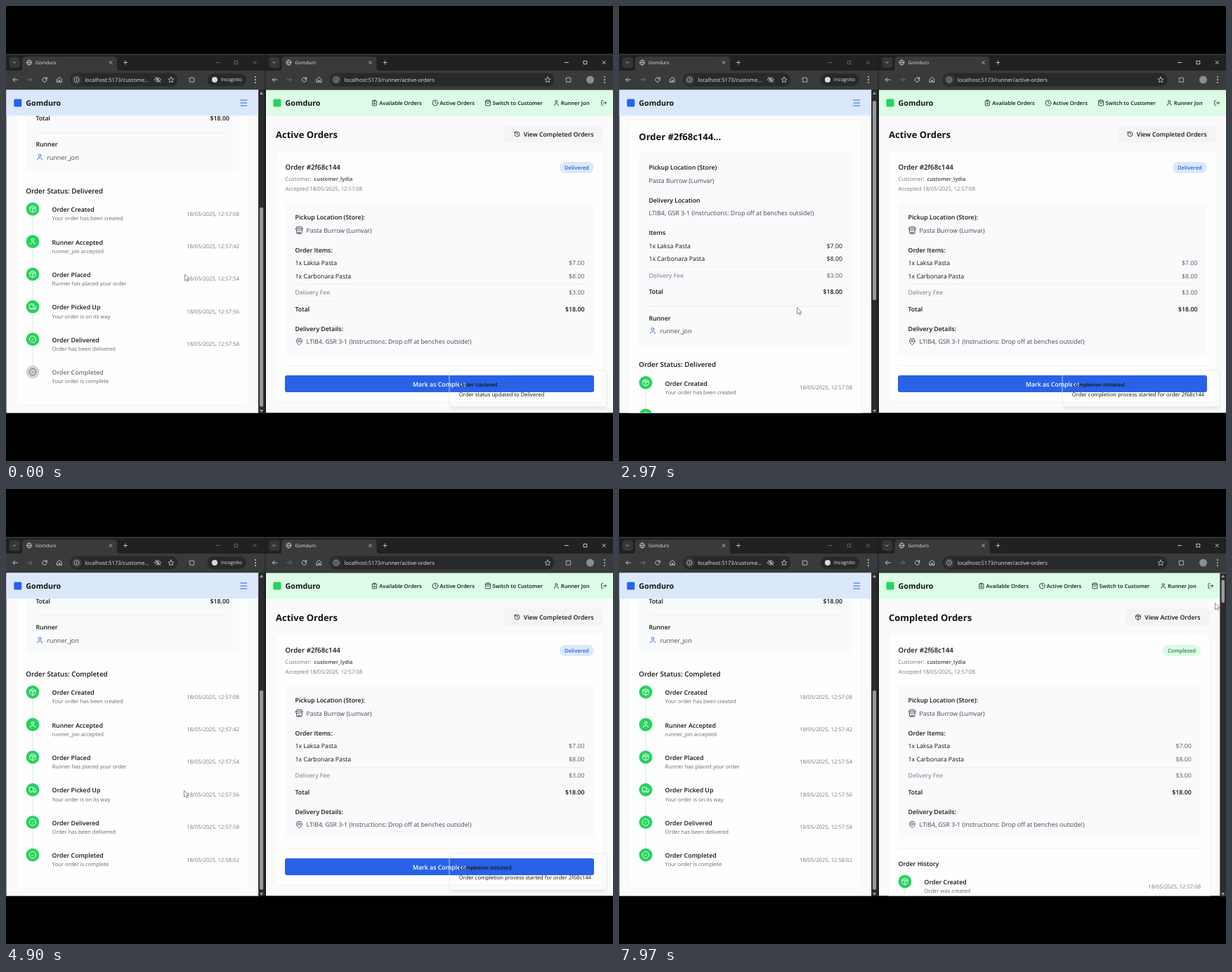
These frames come from a looping animation (864 by 648 pixels, 8 s). An HTML page:

```html
<!DOCTYPE html>
<html lang="en">
<head>
<meta charset="utf-8">
<title>Order tracking</title>
<style>
html, body { margin: 0; width: 100%; height: 100%; overflow: hidden; background: #000; }
svg { display: block; width: 864px; height: 648px; font-family: "Open Sans", "Noto Sans", sans-serif; text-rendering: geometricPrecision; }
</style>
</head>
<body>
<svg id="stage" viewBox="0 0 864 648" xmlns="http://www.w3.org/2000/svg"></svg>
<script>
const APP = 'Gomduro', RUNNER = 'runner_jon', STORE = 'Pasta Burrow (Lumvar)';
const PLACE = 'LTIB4, GSR 3-1 (Instructions: Drop off at benches outside!)';
const SM = 7.65, MD = 8.77, LG = 9.75, XL = 13;
const INK = '#141414', MID = '#41454d', GRAY = '#747880', GREEN = '#27d25e', BLUE = '#2962e6';
const PAGE = '#fafafb', LINK = '#cdeed6';
const TOP = 119.5, BOTTOM = 579.6, VIEW = BOTTOM - TOP;
const LOOP = 8000, MAX_SCROLL = 247.3;

const ring = (cx, cy, r) => `M${cx + r} ${cy}a${r} ${r} 0 1 1-${2 * r} 0a${r} ${r} 0 1 1 ${2 * r} 0`;
const ICONS = {
  bag: 'M6 2 3 6v14a2 2 0 0 0 2 2h14a2 2 0 0 0 2-2V6l-3-4ZM3 6h18M16 10a4 4 0 0 1-8 0',
  box: 'M21 8a2 2 0 0 0-1-1.7l-7-4a2 2 0 0 0-2 0l-7 4A2 2 0 0 0 3 8v8a2 2 0 0 0 1 1.7l7 4a2 2 0 0 0 2 0l7-4A2 2 0 0 0 21 16ZM3.3 7 12 12l8.7-5M12 22V12M7.5 4.3l9 5.1',
  user: 'M19 21v-2a4 4 0 0 0-4-4H9a4 4 0 0 0-4 4v2' + ring(12, 7, 4),
  truck: 'M14 18V6a2 2 0 0 0-2-2H4a2 2 0 0 0-2 2v11a1 1 0 0 0 1 1h2M15 18H9M19 18h2a1 1 0 0 0 1-1v-4l-4-5h-4' + ring(17, 18, 2) + ring(7, 18, 2),
  check: ring(12, 12, 10) + 'M8.5 12l2.5 2.5 4.5-4.5',
  clock: ring(12, 12, 10) + 'M12 6v6l4 2',
  history: 'M3 12a9 9 0 1 0 9-9 9.8 9.8 0 0 0-6.7 2.7L3 8M3 3v5h5M12 7v5l4 2',
  list: 'M9 2h6v4H9zM16 4h2a2 2 0 0 1 2 2v14a2 2 0 0 1-2 2H6a2 2 0 0 1-2-2V6a2 2 0 0 1 2-2h2M9 12h6M9 16h6',
  exit: 'M9 21H5a2 2 0 0 1-2-2V5a2 2 0 0 1 2-2h4M16 17l5-5-5-5M21 12H9',
  pin: 'M20 10c0 6-8 12-8 12s-8-6-8-12a8 8 0 0 1 16 0' + ring(12, 10, 3),
  store: 'M2 7l3-5h14l3 5v3a3 3 0 0 1-5 1 3 3 0 0 1-5 0 3 3 0 0 1-5 0 3 3 0 0 1-5-1zM4 12v8a2 2 0 0 0 2 2h12a2 2 0 0 0 2-2v-8M2 7h20M9 22v-4h6v4',
  globe: ring(12, 12, 10) + 'M2 12h20M12 2c-6 6-6 14 0 20M12 2c6 6 6 14 0 20',
  down: 'M6 9l6 6 6-6',
  back: 'M21 12H4M11 5l-7 7 7 7',
  next: 'M3 12h17M13 5l7 7-7 7',
  reload: 'M20 12a8 8 0 1 1-2.4-5.7L20 9M20 3v6h-6',
  home: 'M4 10l8-7 8 7v11h-6v-7h-4v7H4z',
  info: ring(12, 12, 10) + 'M12 11v6M12 7v1',
  star: 'M12 2l3 7 7 .6-5.4 4.8 1.7 7.1L12 17.7 5.7 21.5l1.7-7.1L2 9.6 9 9z',
  puzzle: 'M4 6h5a3 3 0 0 1 6 0h5v14H4v-5a3 3 0 0 0 0-5z',
  eye: 'M2 12c5-9 15-9 20 0-5 9-15 9-20 0' + ring(12, 12, 3) + 'M3 3l18 18',
  close: 'M5 5l14 14M19 5L5 19',
  plus: 'M12 4v16M4 12h16',
  min: 'M4 12h16',
  max: 'M5 5h14v14H5z'
};

const rect = (x, y, w, h, fill, r = 0, extra = '') =>
  `<rect x="${x}" y="${y}" width="${w}" height="${h}" rx="${r}" fill="${fill}" ${extra}/>`;
const dot = (x, y, r, fill) => `<circle cx="${x}" cy="${y}" r="${r}" fill="${fill}"/>`;
// y is the middle of the capitals
const text = (x, y, str, size = MD, fill = INK, weight = 400, anchor = 'start') =>
  `<text x="${x}" y="${(y + size * .357).toFixed(2)}" font-size="${size}" fill="${fill}" font-weight="${weight}" text-anchor="${anchor}">${str}</text>`;
const bold = (x, y, str, size = MD, fill = INK) => text(x, y, str, size, fill, 600);
const endText = (x, y, str, size, fill, weight) => text(x, y, str, size, fill, weight, 'end');
const icon = (name, x, y, size, color, w = 2) =>
  `<path d="${ICONS[name]}" transform="translate(${x - size / 2} ${y - size / 2}) scale(${size / 24})" fill="none" stroke="${color}" stroke-width="${w}" stroke-linecap="round" stroke-linejoin="round"/>`;
const rule = (x1, x2, y) => rect(x1, y - .3, x2 - x1, .6, '#e8eaed');
const group = (id, body) => `<g id="${id}">${body}</g>`;
const card = (x, y, w, h) => rect(x, y, w, h, '#fefefe', 4, 'stroke="#f1f2f4" stroke-width=".7"');
const panel = (x, y, w, h) => rect(x, y, w, h, '#f9fafb', 4);

function chrome(x, w, url, pillEnd, ctl, lit) {
  const icons = [['back', 13], ['next', 34, '#77797c'], ['reload', 55], ['home', 76]];
  let s = rect(x, 68.5, w, 51, '#202122') + rect(x, 68.5, w, 1, '#4c4d4e') + rect(x, 92, w, TOP - 92, '#393a3b');
  s += rect(x + 5, 73, 15, 15, '#353638', 4) + icon('down', x + 12, 80.5, 7, '#ddd', 2.6);
  s += `<path d="M${x + 19} 92q4 0 4-4v-11q0-5 5-5h125q5 0 5 5v11q0 4 4 4z" fill="#393a3b"/>`;
  s += icon('globe', x + 33, 80.5, 8.5, '#d0d2d4') + text(x + 42, 80.5, APP, 6.6, '#e6e6e6');
  s += icon('close', x + 149, 80.5, 6.5, '#ddd', 2.8) + icon('plus', x + 170, 80.5, 8, '#ddd', 2.4);
  ['min', 'max', 'close'].forEach((n, i) => { s += icon(n, ctl + i * 26.6, 80.5, 7.5, lit ? '#f2f2f2' : '#77797b', 2.6); });
  icons.forEach(([n, dx, c]) => { s += icon(n, x + dx, 105, 9.5, c || '#d0d2d4', 2.3); });
  s += rect(x + 91, 95.5, pillEnd - x - 91, 19, '#28292a', 9.5) + dot(x + 100.5, 105, 7, '#3a3b3d');
  s += icon('info', x + 100.5, 105, 8.5, '#d0d2d4') + text(x + 112.2, 105, url, SM, '#e3e3e3');
  return s + icon('star', pillEnd - 9.5, 105, 9.5, '#d0d2d4');
}
const dots = x => [101, 105, 109].map(y => dot(x, y, .95, '#d6d7d9')).join('');
const scrollTrack = (x, thumb) => rect(x, TOP, 8.9, VIEW, '#2b2b2c') +
  `<path d="M${x + 1.8} 126l2.6-4 2.6 4zM${x + 1.8} 575l2.6 4 2.6-4z" fill="#9b9b9b"/>` + thumb;

function step(x, y, end, kind, title, desc, time, pending) {
  return dot(x, y, 9.4, pending ? '#d0d4da' : GREEN) + icon(kind, x, y, 11.2, pending ? '#565e6b' : '#fff', 1.9) +
    bold(x + 27.5, y + 1, title, MD, pending ? '#6d7179' : INK) +
    text(x + 27.5, y + 13.6, desc, SM, '#666a72') +
    (time ? endText(end, y + 6.8, '18/05/2025, ' + time, SM, GRAY) : '');
}
const connector = (x, y, fill = LINK) => rect(x - .5, y, 1, 27, fill);

function customerPage() {
  let s = card(15, 162, 329.5, 653.5) + text(28.3, 186, 'Order #2f68c144...', XL, INK, 700) + panel(28.3, 208, 303.7, 275);
  s += bold(42.4, 230, 'Pickup Location (Store)') + text(42.4, 248.5, STORE, MD, MID);
  s += bold(42.4, 276.4, 'Delivery Location') + text(42.4, 295, PLACE, MD, MID) + bold(42.4, 322.7, 'Items');
  [['1x Laksa Pasta', '$7.00', 341.5], ['1x Carbonara Pasta', '$8.00', 360]].forEach(([a, b, y]) => {
    s += text(42.4, y, a) + endText(318, y, b);
  });
  s += rule(42.4, 318, 371.5) + text(42.4, 383.5, 'Delivery Fee', MD, GRAY) + endText(318, 383.5, '$3.00', MD, '#595d64');
  s += rule(42.4, 318, 395) + bold(42.4, 407, 'Total') + endText(318, 407, '$18.00', MD, INK, 600);
  s += rule(42.4, 318, 427.5) + bold(42.4, 444.5, 'Runner') + icon('user', 48, 462.5, 11, '#3b68d8') + text(58.5, 463, RUNNER, MD, MID);
  s += group('headOpen', bold(28.3, 510.5, 'Order Status: Delivered', LG)) + group('headDone', bold(28.3, 510.5, 'Order Status: Completed', LG));
  const steps = [
    ['box', 'Order Created', 'Your order has been created', '12:57:08'],
    ['user', 'Runner Accepted', RUNNER + ' accepted', '12:57:42'],
    ['box', 'Order Placed', 'Runner has placed your order', '12:57:54'],
    ['truck', 'Order Picked Up', 'Your order is on its way', '12:57:56'],
    ['check', 'Order Delivered', 'Order has been delivered', '12:57:58']
  ];
  const y0 = 536.4, gap = 46.4, last = ['check', 'Order Completed', 'Your order is complete'];
  steps.forEach((d, i) => {
    const y = y0 + i * gap;
    s += step(38, y, 332, ...d) + (i < 4 ? connector(38, y + 10) : '');
  });
  const y = y0 + 5 * gap;
  return s + group('stepOpen', connector(38, y - 36.4, '#e2e5e9') + step(38, y, 332, ...last, '', true)) +
    group('stepDone', connector(38, y - 36.4) + step(38, y, 332, ...last, '12:58:02'));
}

// dx moves right-aligned parts when the scrollbar takes space
function runnerNav(dx) {
  const items = [['list', 524.5, 'Available Orders', 531.3], ['clock', 611, 'Active Orders', 617.5],
    ['bag', 686, 'Switch to Customer', 692.5], ['user', 783.3, 'Runner Jon', 789.8]];
  return items.map(([n, ix, label, tx]) => icon(n, ix + dx, 138, 9.3, INK) + bold(tx + dx, 138.2, label, 7.6)).join('') +
    icon('exit', 851 + dx, 138, 9, INK);
}

function pageHead(title, kind, label, x, right) {
  return text(384, 183, title, XL, INK, 700) + rect(x, 170.5, right - x, 24.5, '#f3f4f6', 4) +
    icon(kind, x + 18, 182.5, 9.3, INK) + bold(x + 27.2, 183, label);
}

function orderCard(dx, height, badge, badgeX, badgeW, bg, fg) {
  const r = 836.8 + dx, price = 823.5 + dx;
  let s = card(384, 206.5, 466 + dx, height) + bold(397.6, 230, 'Order #2f68c144', LG);
  s += rect(badgeX, 222, badgeW, 16, bg, 8) + text(badgeX + badgeW / 2, 230.2, badge, 7.6, fg, 600, 'middle');
  s += text(397.6, 246.5, 'Customer:', SM, GRAY) + bold(438.5, 246.5, 'customer_lydia', 7.5, '#3f444d') + text(397.6, 260.5, 'Accepted 18/05/2025, 12:57:08', SM, GRAY);
  s += panel(397.6, 280, r - 397.6, 218) + bold(411.5, 301, 'Pickup Location (Store):');
  s += icon('store', 417.3, 319.3, 11.4, MID) + text(427.6, 320, STORE, MD, MID) + bold(411.5, 347.5, 'Order Items:');
  [['1x Laksa Pasta', '$7.00', 366], ['1x Carbonara Pasta', '$8.00', 384.7]].forEach(([a, b, y]) => {
    s += text(411.5, y, a) + endText(price, y, b, MD, '#595d64');
  });
  s += rule(411.5, price, 396.5) + text(411.5, 408.2, 'Delivery Fee', MD, GRAY) + endText(price, 408.2, '$3.00', MD, '#595d64');
  s += rule(411.5, price, 420) + bold(411.5, 431.8, 'Total') + endText(price, 431.8, '$18.00', MD, INK, 600);
  s += bold(411.5, 459.6, 'Delivery Details:') + icon('pin', 417.3, 478, 11.4, MID) + text(427.6, 478.2, PLACE, MD, MID);
  return s + rule(397.6, r, 512.5);
}

const SHIFT = -8.7;
const activeHead = runnerNav(0) + pageHead('Active Orders', 'history', 'View Completed Orders', 709.5, 849);
const activeOrder = orderCard(0, 357, 'Delivered', 788, 48.8, '#dbe9fd', '#2f62d0') +
  rect(397, 526, 440, 24, BLUE, 3) + text(617.2, 538.6, 'Mark as Complete', MD, '#fff', 600, 'middle');
const completed = runnerNav(SHIFT) + pageHead('Completed Orders', 'box', 'View Active Orders', 721, 841) +
  orderCard(SHIFT, 420, 'Completed', 774, 54, '#dcfae7', '#25834d') + bold(397.6, 534, 'Order History') +
  connector(407, 569) + step(407, 559, 828, 'box', 'Order Created', 'Order was created', '12:57:08') +
  scrollTrack(855.3, rect(857.5, 129.5, 4.5, 32.5, '#9b9b9b', 2));
const toastText = (title, body) => bold(644.8, 538.8, title, 7.55) + text(644.8, 552.8, body, SM);

document.getElementById('stage').innerHTML = `
<defs>
  <clipPath id="leftView"><rect x="0" y="156" width="360" height="${BOTTOM - 156}"/></clipPath>
  <clipPath id="rightView"><rect x="370" y="${TOP}" width="494" height="${VIEW}"/></clipPath>
  <filter id="soft" x="-10%" y="-30%" width="120%" height="170%"><feGaussianBlur stdDeviation="2"/></filter>
</defs>` +
  rect(0, 0, 864, 648, '#000') + rect(0, 69, 864, 511, '#18191a') +
  chrome(0, 368.5, 'localhost:5173/custome...', 244.5, 301, false) +
  icon('eye', 216, 105, 10.5, '#d0d2d4') + icon('puzzle', 264.5, 105, 9.5, '#d0d2d4') +
  rect(286.5, 96, 55.5, 18, '#28292a', 9) + dot(297, 105, 4, '#d8d9db') + text(306, 105, 'Incognito', 6.9, '#ececec') + dots(355) +
  chrome(369.5, 494.5, 'localhost:5173/runner/active-orders', 780.5, 798, true) +
  icon('puzzle', 800.5, 105, 9.5, '#d0d2d4') + dot(831.5, 105, 5.5, '#8b8d90') + dots(852) +
  rect(0.5, TOP, 359, VIEW, PAGE) +
  `<g clip-path="url(#leftView)">${group('page', customerPage())}</g>` +
  rect(0.5, TOP, 359, 36.7, '#dbe8fc') + rect(11.3, 132.5, 11, 11, BLUE, 1.5) + text(28.3, 138.3, APP, 10.7, INK, 700) +
  [134, 138, 142].map(y => rect(333.3, y - .55, 10, 1.1, BLUE, .5)).join('') +
  scrollTrack(359.2, '<rect id="thumb" x="361.1" width="5" height="284" rx="2.5" fill="#9b9b9b"/>') +
  `<g clip-path="url(#rightView)">` + rect(370, TOP, 494, VIEW, PAGE) + rect(370, TOP, 494, 36.7, '#dcfce7') +
  rect(380.5, 132.5, 11, 11, GREEN, 1.5) + text(397.6, 138.3, APP, 10.7, INK, 700) +
  group('active', activeHead) + group('order', activeOrder) +
  group('loading', text(617.2, 234, 'Loading orders...', MD, '#2b2b2b', 400, 'middle')) + group('done', completed) +
  group('toast', `<path d="M632 571h223v2.500h-223z" fill="#000" opacity=".13" filter="url(#soft)"/>` +
    rect(631, 519, 224.5, 53, 'none', 4, 'stroke="#e3e5ea" stroke-width=".8"') +
    group('toastA', toastText('Order Updated', 'Order status updated to Delivered')) +
    group('toastB', toastText('Completion Initiated', 'Order completion process started for order 2f68c144'))) +
  `</g>` +
  group('arrow', '<path d="M0 0v9.3l2.2-2 1.5 3.2 1.4-.65-1.45-3.1h3z" fill="#fff" stroke="#444" stroke-width=".6"/>') +
  group('hand', '<path d="M-1 .8q1-1.5 2 0v4q2.3-.6 3 .5 1.7.1 1.7 1.8 0 3.4-1.7 4.4h-3.7q-1.5-1.7-3.2-4.2.6-1.5 1.9-.2z" fill="#fff" stroke="#222" stroke-width=".7"/>');

const el = id => document.getElementById(id);
const show = (id, on) => el(id).setAttribute('visibility', on ? 'inherit' : 'hidden');
const smooth = u => { u = Math.min(1, Math.max(0, u)); return u * u * (3 - 2 * u); };

const PATH = [[0, 254.5, 382], [120, 254.5, 382], [800, 508, 527], [1680, 508, 527], [2150, 253.5, 429.5],
  [5300, 253.5, 429.5], [6080, 261, 427], [6280, 582, 369], [6390, 582, 369], [6650, 784, 183],
  [7000, 784, 183], [7700, 848.5, 162.5], [8000, 848.5, 162.5]];
function pointer(t) {
  const i = PATH.findIndex(p => p[0] > t), a = PATH[i - 1], b = PATH[i];
  const k = smooth((t - a[0]) / (b[0] - a[0]));
  return [a[1] + (b[1] - a[1]) * k, a[2] + (b[2] - a[2]) * k];
}

function draw(t) {
  const scroll = MAX_SCROLL * (1 - smooth((t - 2000) / 560) + smooth((t - 3600) / 840));
  el('page').setAttribute('transform', `translate(0 ${-scroll})`);
  el('thumb').setAttribute('y', 135 + scroll * .614);

  const isDone = t >= 3300, loading = t >= 5750 && t < 6800, completedView = t >= 6800;
  show('headOpen', !isDone);
  show('stepOpen', !isDone);
  show('headDone', isDone);
  show('stepDone', isDone);
  show('active', !completedView);
  show('order', t < 5750);
  show('loading', loading);
  show('done', completedView);
  show('toast', t < 7000);
  show('toastA', t < 1150);
  show('toastB', t >= 1150 && t < 7000);

  const [x, y] = pointer(t);
  const onButton = t < 5750 && x > 398 && x < 837 && y > 526 && y < 550;
  const onLink = x > 710 && x < 841 && y > 170 && y < 195;
  show('hand', onButton || onLink);
  show('arrow', !(onButton || onLink));
  for (const id of ['arrow', 'hand']) el(id).setAttribute('transform', `translate(${x} ${y})`);
}

function tick() {
  draw(performance.now() % LOOP);
  requestAnimationFrame(tick);
}
tick();
</script>
</body>
</html>
```
